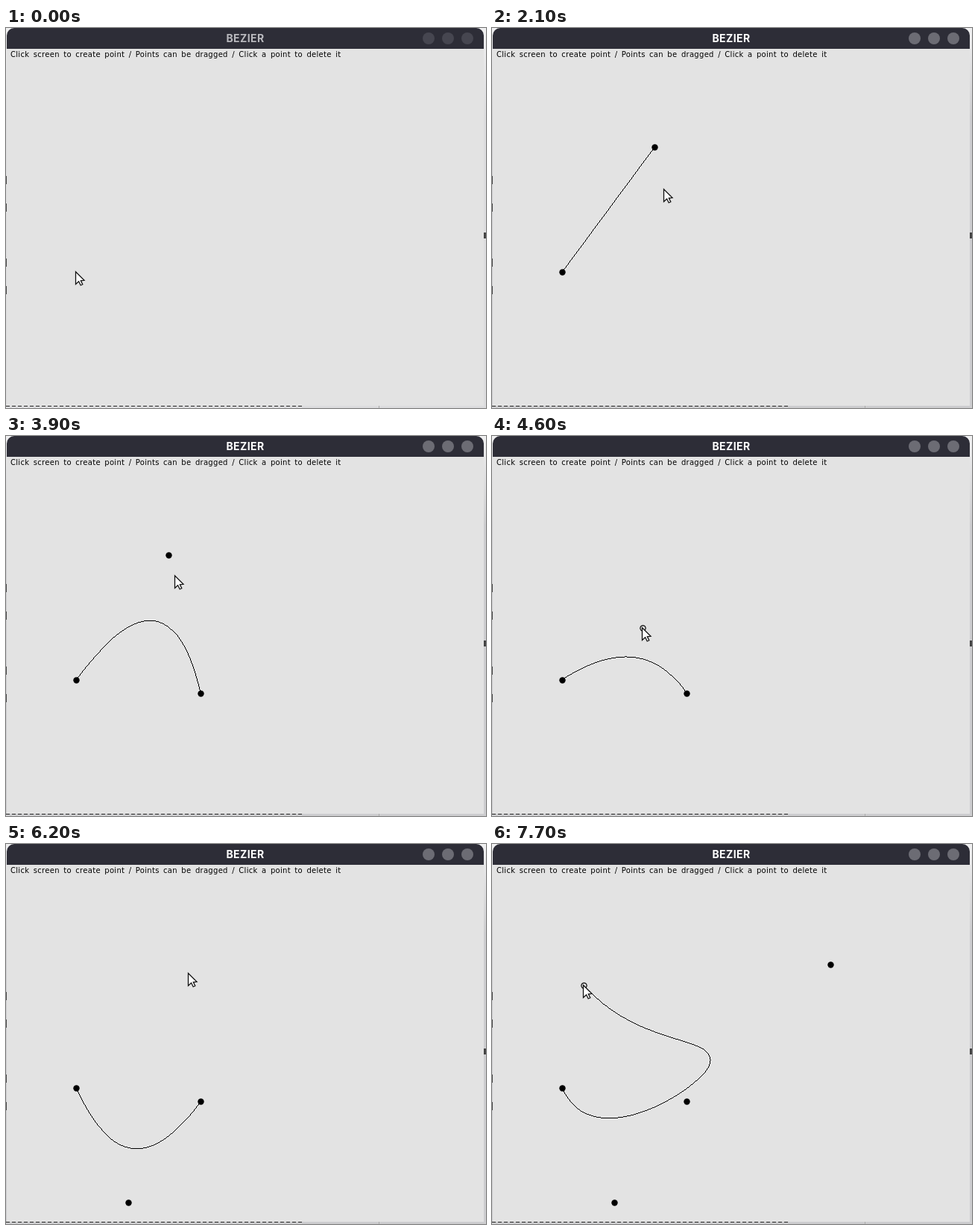
Write an HTML page with a canvas that moves like this. It is 644 px wide and 511 px high and loops after 8000 ms.

```html
<!DOCTYPE html>
<html lang="en">
<head>
<meta charset="utf-8">
<title>BEZIER</title>
<style>
html, body { margin: 0; width: 644px; height: 511px; overflow: hidden; }
canvas { display: block; }
</style>
</head>
<body>
<canvas id="stage" width="644" height="511"></canvas>
<script>
const ctx = document.getElementById('stage').getContext('2d');
const TICK = 100, TICKS = 80;
const PAPER = '#e3e3e3', INK = '#000';

const start = { x: 93, y: 327 };
const drag = { from: 46, to: 51, x: 163, y: 481 };
const gestures = [
  { from: 8, to: 11, x: 149, y: 265 },
  { from: 12, to: 16, x: 217, y: 159 },
  { from: 21, to: 26, x: 260, y: 345 },
  { from: 32, to: 39, x: 226, y: 187 },
  { from: 40, to: 42, x: 217, y: 159 },
  drag,
  { from: 54, to: 57, x: 316, y: 300 },
  { from: 58, to: 60, x: 194, y: 186 },
  { from: 62, to: 62, x: 244, y: 173 },
  { from: 63, to: 63, x: 568, y: 182 },
  { from: 64, to: 66, x: 453, y: 161 },
  { from: 69, to: 76, x: 122, y: 189 }
];
const clicks = [4, 17, 28, 67, 77];

const easeOut = k => 1 - (1 - k) ** 2;

function pointerAt(tick) {
  let { x, y } = start;
  for (const g of gestures) {
    if (tick < g.from) break;
    const k = easeOut(Math.min(1, (tick - g.from + 1) / (g.to - g.from + 1)));
    x += (g.x - x) * k;
    y += (g.y - y) * k;
  }
  return [Math.round(x), Math.round(y)];
}

// A point lands just inside the pointer tip
const pointUnder = tick => pointerAt(tick).map(v => v + 1);

function pointsAt(tick) {
  const points = clicks.filter(t => t <= tick).map(pointUnder);
  if (tick >= drag.from) points[1] = pointUnder(Math.min(tick, drag.to));
  // The fourth point joins the curve ahead of the third
  if (points.length > 3) points.splice(2, 0, points.splice(3, 1)[0]);
  return points;
}

function bezier(points, t) {
  while (points.length > 1) {
    points = points.slice(1).map((p, i) => p.map((v, j) => points[i][j] + (v - points[i][j]) * t));
  }
  return points[0];
}

function rect(color, x, y, w, h) {
  ctx.fillStyle = color;
  ctx.fillRect(x, y, w, h);
}

function disc(x, y, r, color) {
  ctx.fillStyle = color;
  ctx.beginPath();
  ctx.arc(x, y, r, 0, 7);
  ctx.fill();
}

function label(text, x, y, font, color, align, letterGap, wordGap) {
  ctx.font = font;
  ctx.fillStyle = color;
  ctx.textAlign = align;
  ctx.letterSpacing = letterGap + 'px';
  ctx.wordSpacing = wordGap + 'px';
  ctx.fillText(text, x, y);
}

function drawDesktop(focused) {
  const shade = ctx.createLinearGradient(0, 0, 0, 120);
  shade.addColorStop(0, '#f0f0f1');
  shade.addColorStop(1, focused ? '#cdcdcf' : '#dcdcde');
  rect(shade, 0, 0, 644, 511);
  for (const y of [199, 236, 310, 347]) rect('#444', 0, y, 1, 11);
  rect('#444', 641, 275, 3, 8);
  rect('#aaa', 500, 508, 1, 3);
  for (let x = 0; x < 397; x += 8) rect('#222', x, 508, 5, 1);
}

function drawWindow(focused) {
  ctx.fillStyle = '#2d2d37';
  ctx.beginPath();
  ctx.roundRect(1, 0, 640, 40, [10, 10, 0, 0]);
  ctx.fill();
  rect(PAPER, 1, 28, 640, 480);
  for (let i = 0; i < 3; i++) disc(567 + 26 * i, 14, 8, focused ? '#6c6c74' : '#464650');
  label('BEZIER', 321, 19, 'bold 14px Inter, sans-serif', focused ? '#fff' : '#b9b9be', 'center', 0.4, 0);
  label('Click screen to create point / Points can be dragged / Click a point to delete it',
    6, 39, '10px "DejaVu Sans", sans-serif', INK, 'left', 0.3, 1.95);
}

function drawPoint([x, y], hovered) {
  disc(x + 0.5, y + 0.5, 4.2, INK);
  if (hovered) disc(x + 0.5, y + 0.5, 3, PAPER);
}

// One-pixel line: plots each pixel once and skips staircase corners
function drawCurve(points) {
  if (points.length < 2) return;
  const pixels = [];
  for (let i = 0; i <= 1500; i++) {
    const [x, y] = bezier(points, i / 1500).map(Math.floor);
    const last = pixels.at(-1), before = pixels.at(-2);
    if (last && last[0] === x && last[1] === y) continue;
    if (before && Math.abs(before[0] - x) === 1 && Math.abs(before[1] - y) === 1) pixels.pop();
    pixels.push([x, y]);
  }
  for (const [x, y] of pixels) rect(INK, x, y, 1, 1);
}

const arrow = new Path2D('M.5 .8V17.6L4.6 13.8L7.2 19L9.8 17.8L7.3 12.8L12 12.3Z');

function drawPointer(x, y) {
  ctx.save();
  ctx.translate(x, y);
  ctx.fillStyle = '#fff';
  ctx.strokeStyle = '#111';
  ctx.lineWidth = 1.3;
  ctx.fill(arrow);
  ctx.stroke(arrow);
  ctx.restore();
}

function draw(now) {
  const tick = Math.floor(now / TICK) % TICKS;
  const focused = tick >= clicks[0];
  const [px, py] = pointerAt(tick);
  const points = pointsAt(tick);
  drawDesktop(focused);
  drawWindow(focused);
  for (const p of points) drawPoint(p, Math.hypot(p[0] - px, p[1] - py) < 4);
  drawCurve(points);
  drawPointer(px, py);
  requestAnimationFrame(draw);
}
requestAnimationFrame(draw);
</script>
</body>
</html>
```
